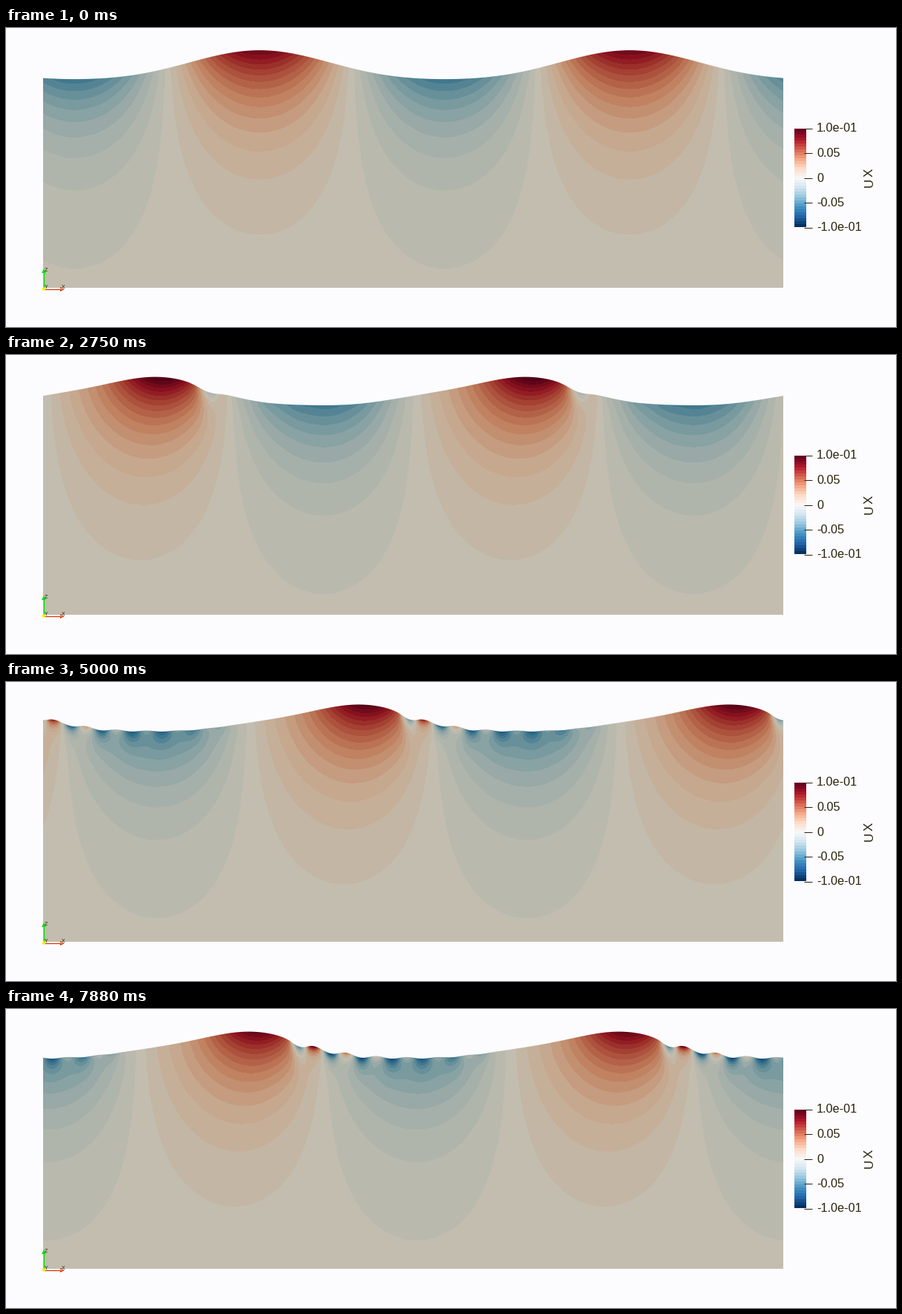
Write a matplotlib script that moves like this. It is 1200 px wide and 404 px high and loops after 8 s.

```python
import numpy as np
import matplotlib.pyplot as plt
from matplotlib.animation import FuncAnimation
from matplotlib.patches import Polygon, Circle

W, H, DPI = 1200, 404, 100
FRAMES, INTERVAL = 64, 125
PX = 72 / DPI

# Tank geometry in pixels
LEFT, RIGHT, TOP, BED = 50, 1048, 25, 351
WAVELENGTH = 499
K = 2 * np.pi / WAVELENGTH
SPEED, START = 15.25, 342
MEAN_LEVEL, CREST_LEVEL = 52, 30
BACK = np.array([252, 252, 254])
INK = "#28240c"

# Velocity is measured in colour steps either side of zero
STEPS = 16
BANDS = plt.get_cmap("RdBu_r")(np.linspace(0, 1, 2 * STEPS + 1))[:, :3] * 255
SHADE = np.array([0.785, 0.765, 0.71])
WATER = (BANDS * SHADE).astype(np.float32)

ROWS = (np.arange(TOP, BED) + 0.5)[:, None].astype(np.float32)
FADE = np.exp(-K * (ROWS - CREST_LEVEL))


def logistic(x):
    return 1 / (1 + np.exp(-x))


def ripples(s, frame):
    """Short waves ahead of the front, spreading and growing with time."""
    phase = 2 * np.pi * (s - 134) / np.where(s < 134, 50, 41)
    env = np.clip((s - 75) / 30, 0, 1) * np.clip((369 - s) / 40, 0, 1)
    growth = logistic((frame - 35 - (s - 110) / 50) / 4)
    return -np.cos(phase) * env * growth * np.exp(-(s - 110) / 110)


def water(frame):
    """RGB image of the tank, computed for one wavelength and tiled."""
    x = np.arange(LEFT, LEFT + WAVELENGTH) + 0.5
    s = (x - START - SPEED * frame + 130) % WAVELENGTH - 130
    theta = K * s
    cos = np.cos(theta)
    lean = min(frame / 20, 1)
    late = logistic((frame - 30) / 5)
    skew = lean * np.sin(2 * theta) * (1 + cos) / 2
    front = lean * np.exp(-((s - 95) / 20) ** 2)
    small = ripples(s, frame)

    height = (19.5 - 0.8 * lean - 1.7 * late) * cos + 5 * skew
    height += (2.4 + 0.5 * late) * np.cos(2 * theta)
    surface = MEAN_LEVEL - height + 5.5 * front - 3.5 * small

    amp = 14.8 * (1 - 0.15 * (frame / FRAMES) ** 1.5)
    f32 = np.float32
    depth = np.maximum(ROWS - surface.astype(f32), 0)
    u = FADE * (amp * cos).astype(f32) + FADE ** 2 * (5.5 * skew).astype(f32)
    u -= np.exp(-depth / 15) * (8 * front ** 2).astype(f32)
    u += np.exp(-0.13 * depth) * (17 * small).astype(f32)

    band = np.clip(np.rint(u - 0.14), -STEPS, STEPS).astype(int) + STEPS
    cover = np.clip(ROWS + 0.5 - surface, 0, 1)[..., None]
    rgb = BACK + (WATER[band] - BACK) * cover
    return np.tile(np.round(rgb).astype(np.uint8), (1, 2, 1))


def line(xs, ys, color, width=1):
    ax.plot(xs, ys, color=color, lw=width * PX, solid_capstyle="butt")


def label(x, y, text, size, **kw):
    kw = {"ha": "center", "va": "center", "color": INK, **kw}
    ax.text(x, y, text, fontsize=size * PX, family="Liberation Sans", **kw)


def draw_colorbar():
    bar = np.round(BANDS[::-1, None]).astype(np.uint8)
    ax.imshow(bar, extent=(1063, 1079, 269, 136), interpolation="nearest",
              aspect="auto")
    names = ["1.0e-01", "0.05", "0", "-0.05", "-1.0e-01"]
    for y, name in zip(np.linspace(135.5, 269.5, 5), names):
        line([1076, 1087], [y, y], INK)
        label(1093, y + 5, name, 16.2, ha="left", va="baseline")
    label(1164.5, 208.5, "U", 17, rotation=90)
    label(1164.5, 195, "X", 17, rotation=90)


def draw_axes_marker():
    green, red = "#10e010", "#dc3200"
    line([51, 76], [351.5, 351.5], "#f6f4ee")
    line([51, 51], [352, 329], green, 1.4)
    line([51, 74], [353, 353], red, 1.2)
    ax.add_patch(Polygon([(48, 331), (54, 331), (51, 325)], color=green, lw=0))
    ax.add_patch(Polygon([(73, 350), (73, 356), (79, 353)], color=red, lw=0))
    ax.add_patch(Circle((51, 352.5), 2.2, color="#f0f000", lw=0, zorder=4))
    for x, y, name in [(54, 327.5, "Z"), (54, 351, "Y"), (77, 350.5, "X")]:
        label(x, y, name, 7)


fig = plt.figure(figsize=(W / DPI, H / DPI), dpi=DPI, facecolor=BACK / 255)
ax = fig.add_axes([0, 0, 1, 1])
tank = ax.imshow(water(0), extent=(LEFT, RIGHT, BED, TOP),
                 interpolation="nearest", aspect="auto")
draw_colorbar()
draw_axes_marker()
ax.set_xlim(0, W)
ax.set_ylim(H, 0)
ax.axis("off")


def update(frame):
    tank.set_data(water(frame))
    return [tank]


anim = FuncAnimation(fig, update, frames=FRAMES, interval=INTERVAL,
                     repeat=True, repeat_delay=0, blit=False)
plt.show()
```
